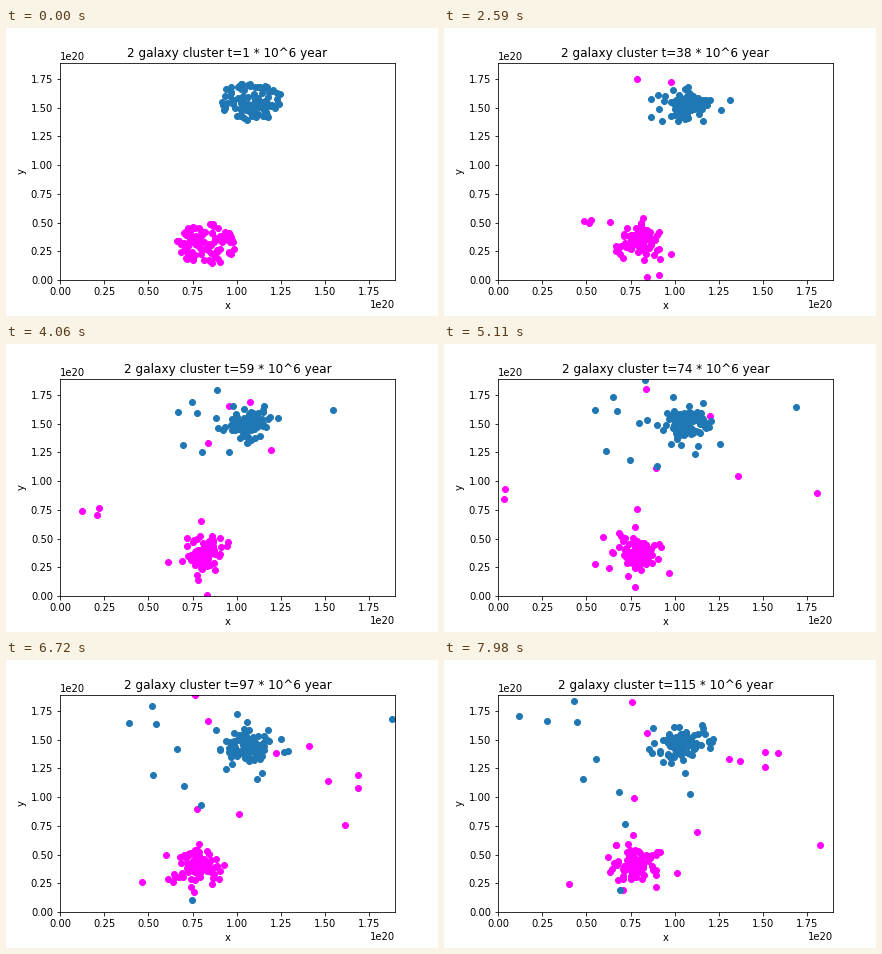
Animation, 432 px wide and 288 px high, one loop 8000 ms. Source, as a matplotlib script:

```python
import numpy as np
import matplotlib.pyplot as plt
from matplotlib.animation import FuncAnimation

plt.rcParams["text.kerning_factor"] = 6

W, H, DPI = 432, 288, 72
LOOP, FRAMES = 8000, 115
LIGHT_YEAR = 3e8 * 365.25 * 24 * 3600
SIDE = 2e4 * LIGHT_YEAR                          # edge of the periodic box
ORIGIN, BOX = np.array([54, 252]), np.array([334.8, -217.44])
STARS, BOUNCE = 100, 25
LAST = FRAMES - 1


def smooth(u):
    u = np.clip(u, 0, 1)
    return u * u * (3 - 2 * u)


class Galaxy:
    """Stars that collapse, bounce, then orbit or escape; stage pixels.

    Each burst is a bend and the unwrapped end points of its escaping stars.
    """

    def __init__(self, seed, first, last, radii, sigma, bursts):
        rng = np.random.default_rng(seed)
        self.first, self.last = np.array(first), np.array(last)

        angle = rng.uniform(0, 2 * np.pi, STARS)
        r = rng.uniform(0, 1, (STARS, 1)) ** 0.55
        disc = np.stack([np.cos(angle), np.sin(angle)], axis=1)
        self.home = r * disc * radii

        spread = rng.lognormal(-0.12, 0.35, (STARS, 1))
        self.axis_a = rng.normal(0, 1, (STARS, 2)) * sigma * spread
        self.axis_b = rng.normal(0, 1, (STARS, 2)) * sigma * spread
        self.speed = rng.uniform(0.12, 0.26, (STARS, 1)) / spread

        self.ends = np.array([end for _, ends in bursts for end in ends])
        self.bends = np.array([bend for bend, ends in bursts for _ in ends])

    def center(self, k):
        return self.first + (self.last - self.first) * k / LAST

    def collapse(self, k):
        fall = max(1 - (k / 24) ** 2, 0) ** (2 / 3)
        return self.center(k) + self.home * max(fall, 0.15)

    def orbit(self, k):
        grow = 1 + 0.4 * k / LAST
        swing = (self.axis_a * np.cos(self.speed * k)
                 + self.axis_b * np.sin(self.speed * k))
        return self.center(k) + swing * grow

    def escape(self, k):
        """Slowing flight to the end points, bent on the way."""
        s = ((k - BOUNCE) / (LAST - BOUNCE)) ** 0.7
        start = self.collapse(BOUNCE)[:len(self.ends)]
        return start + (self.ends - start) * s + self.bends * s * (1 - s)

    def at(self, k):
        mix = smooth((k - 24) / 10)
        stars = self.collapse(k) * (1 - mix) + self.orbit(k) * mix
        if k > BOUNCE:
            stars[:len(self.ends)] = self.escape(k)
        return (stars - ORIGIN) / BOX % 1 * SIDE


pink = Galaxy(
    4, first=(200.5, 216), last=(189, 204), radii=(29.5, 20.5), sigma=(8, 6.5),
    bursts=[
        ((0, 45), [(-14, 92), (-14, 107), (-50, 99)]),
        ((-90, 60), [(376, 402), (296, 318), (253, 389), (334, 310)]),
        ((0, 0), [(190, 138), (203, 290), (188, 259), (125, 224)]),
    ])
blue = Galaxy(
    11, first=(245, 73), last=(240, 86), radii=(30.5, 20.5), sigma=(10, 6.2),
    bursts=[
        ((0, 0), [(410, 56), (130, 41), (103, 61), (133, 62), (176, 13)]),
        ((-60, 15), [(139, 119), (175, 132)]),
        ((40, -50), [(181, 164), (152, 99), (246, 134)]),
    ])

fig, ax = plt.subplots(figsize=(W / DPI, H / DPI), dpi=DPI)
fig.subplots_adjust(left=0.125, right=0.9, bottom=0.125, top=0.88)
ax.set(xlim=(0, SIDE), ylim=(0, SIDE), xlabel="x", ylabel="y")
pink_dots = ax.scatter(*pink.at(0).T, color="magenta")
blue_dots = ax.scatter(*blue.at(0).T, color="tab:blue")
title = ax.set_title("")


def draw(k):
    pink_dots.set_offsets(pink.at(k))
    blue_dots.set_offsets(blue.at(k))
    title.set_text(f"2 galaxy cluster t={k + 1} * 10^6 year")
    return pink_dots, blue_dots, title


anim = FuncAnimation(fig, draw, frames=FRAMES, interval=LOOP / FRAMES,
                     init_func=lambda: draw(0), repeat=True, repeat_delay=0)
plt.show()
```
